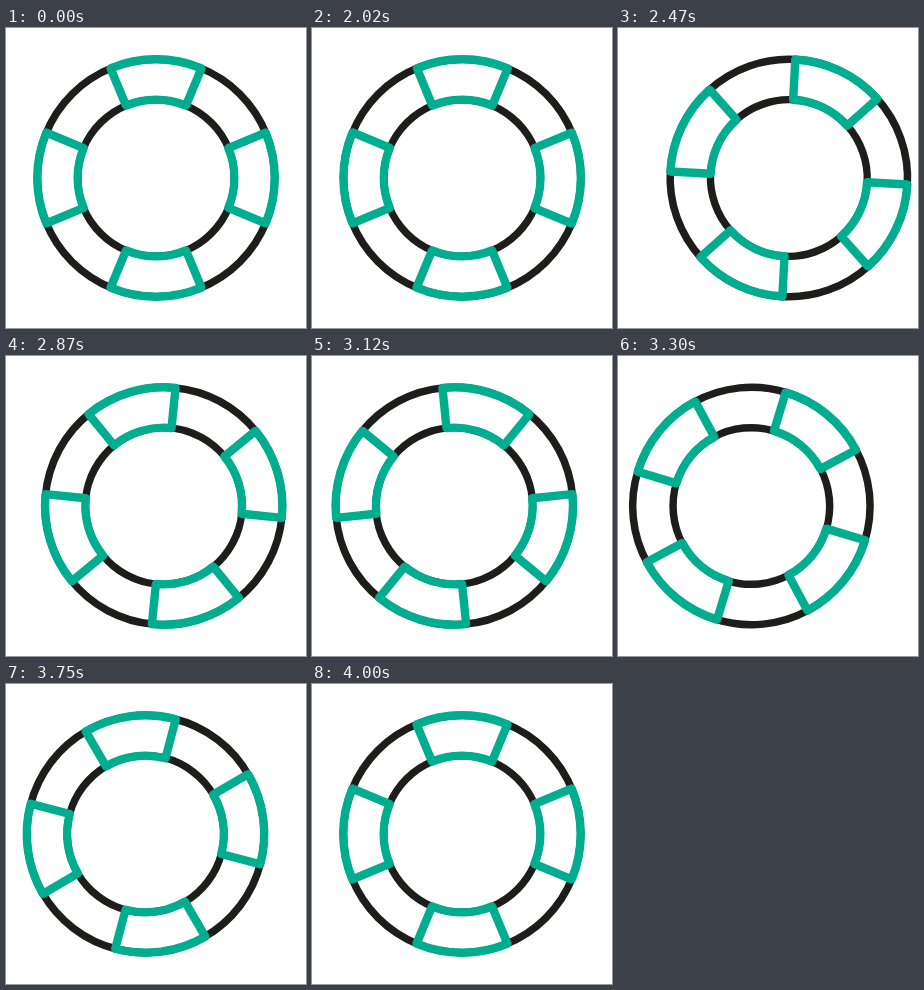
Animation of 300 by 300 pixels, one loop 4020 ms. Source, as an HTML page:

```html
<!DOCTYPE html>
<html lang="en">
<head>
<meta charset="utf-8">
<title>Rolling lifebuoy</title>
<style>
  html, body { margin: 0; width: 100%; height: 100%; overflow: hidden; background: #fff; }
  svg { display: block; width: 100%; height: 100%; }
  circle, path { fill: none; }
  circle { stroke: #1d1d1b; stroke-width: 7.5; }
  path { stroke: #00ae8f; stroke-width: 8.4; stroke-linejoin: round; }
</style>
</head>
<body>
<svg viewBox="0 0 300 300"><g id="ring"></g></svg>
<script>
  const LOOP = 4020, REST = 2000, STEP = 25, SWAY = 21;
  const OUTER = 118.7, INNER = 78.3, HALF_ANGLE = 22.5;
  const ring = document.getElementById('ring');

  const point = (r, deg) => {
    const a = deg * Math.PI / 180;
    return `${r * Math.sin(a)} ${-r * Math.cos(a)}`;
  };

  const band = mid => {
    const from = mid - HALF_ANGLE, to = mid + HALF_ANGLE;
    return `M${point(OUTER, from)}A${OUTER} ${OUTER} 0 0 1 ${point(OUTER, to)}` +
      `L${point(INNER, to)}A${INNER} ${INNER} 0 0 0 ${point(INNER, from)}Z`;
  };

  ring.innerHTML =
    [OUTER, INNER].map(r => `<circle r="${r}"/>`).join('') +
    [0, 90, 180, 270].map(a => `<path d="${band(a)}"/>`).join('');

  const smooth = p => p * p * (3 - 2 * p);

  // [time, offset] keys of the sideways sway
  const sway = [[0, 0], [500, SWAY], [1500, -SWAY], [2000, 0]];

  function offsetAt(t) {
    const i = Math.max(1, sway.findIndex(key => t <= key[0]));
    const [t0, x0] = sway[i - 1], [t1, x1] = sway[i];
    return x0 + (x1 - x0) * smooth((t - t0) / (t1 - t0));
  }

  function draw(ms) {
    // The motion advances in 25 ms steps shown on a 10 ms clock
    const clock = Math.floor((ms % LOOP) / 10) * 10 + 5;
    const stepped = Math.floor(clock / STEP) * STEP;
    const t = Math.min(2000, Math.max(0, stepped - REST));
    const turn = 180 * smooth(t / 2000);
    ring.setAttribute('transform', `translate(${150 + offsetAt(t)} 150) rotate(${turn})`);
  }

  const start = performance.now();
  function tick() {
    draw(performance.now() - start);
    requestAnimationFrame(tick);
  }
  tick();
</script>
</body>
</html>
```
